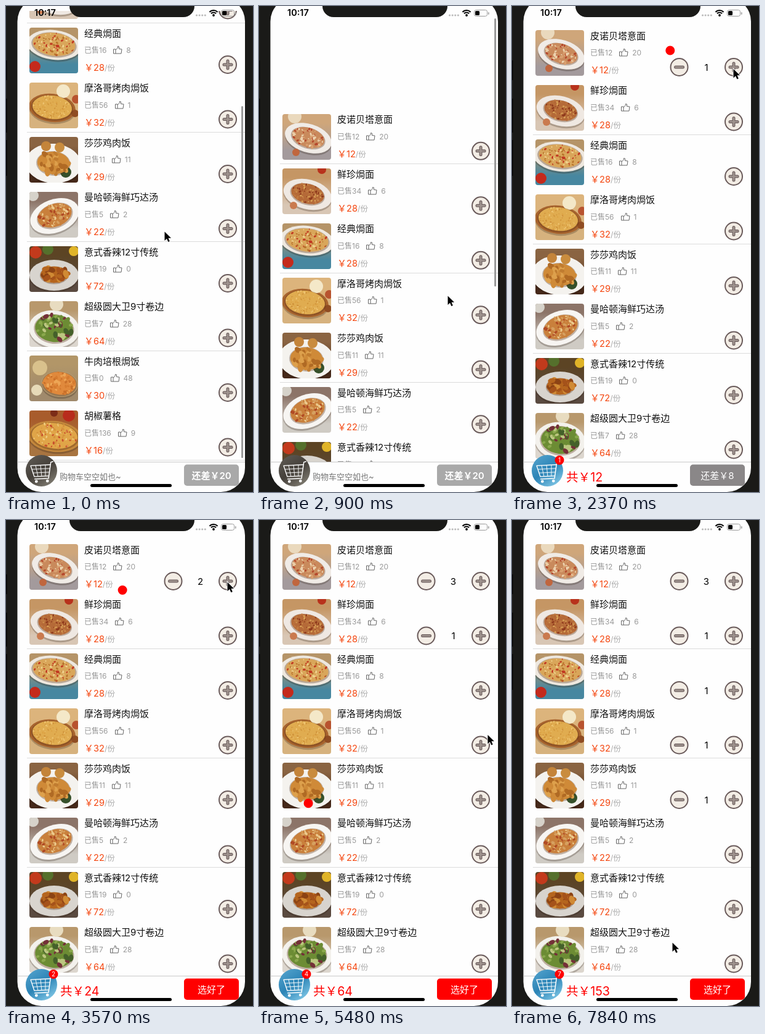
These frames come from a looping animation (401x787 px, 7990 ms). An HTML page with a canvas:

```html
<!DOCTYPE html>
<html lang="zh">
<head>
<meta charset="utf-8">
<style>
html, body { margin: 0; width: 100%; height: 100%; overflow: hidden; background: #1a1a18; }
canvas { display: block; }
</style>
</head>
<body>
<canvas id="stage" width="401" height="787"></canvas>
<script>
const ctx = document.getElementById('stage').getContext('2d');
const FONT = 'Inter, "Noto Sans CJK SC", "Noto Sans CJK", sans-serif';
const LOOP = 7990, STEP = LOOP / 54;
const PITCH = 88.5, REST_TOP = 39, FLIGHT = 650, MINIMUM = 20;

// name, sold, likes, price
const menu = [
  ['皮诺贝塔意面', 12, 20, 12],
  ['鲜珍焗面', 34, 6, 28],
  ['经典焗面', 16, 8, 28],
  ['摩洛哥烤肉焗饭', 56, 1, 32],
  ['莎莎鸡肉饭', 11, 11, 29],
  ['曼哈顿海鲜巧达汤', 5, 2, 22],
  ['意式香辣12寸传统', 19, 0, 72],
  ['超级圆大卫9寸卷边', 7, 28, 64],
  ['牛肉培根焗饭', 0, 48, 30],
  ['胡椒薯格', 136, 9, 16]
];

// background top and bottom, plate colour, plate [x, y, rx, ry, angle], [food share, chunk size], food colours, side circles [colour, x, y, r]
const dishes = [
  ['#cfa67a', '#a39a9c', '#f0ebe6', [42, 39, 39, 23, .3], [.74, 2.5], '#c98a5c #b5482c #ecd2ae #d9a070', [['#ead9bd', 20, 4, 11], ['#c0663e', 22, 62, 6]]],
  ['#c59664', '#d8c6b4', '#efe8e2', [41, 42, 40, 24, .25], [.72, 2], '#b56a38 #8f3a1c #d9a258 #c07a40', [['#b8321c', 64, 2, 7], ['#ca7a4e', 18, 60, 6]]],
  ['#b59468', '#4787a0', '#eee8df', [40, 28, 44, 24, .12], [.84, 2.2], '#d9a65a #c23a22 #efd08c #b8742c', [['#c42a1c', 9, 63, 9]]],
  ['#dcb47c', '#d6b27e', '#a8642e', [37, 41, 38, 23, .12], [.9, 1.6], '#e0ac50 #cf923a #eec472 #dca244', [['#f4e8c8', 55, 14, 11], ['#b8532f', 76, 27, 7], ['#8f4c22', 74, 50, 6]]],
  ['#8a6442', '#46291a', '#f4f2ee', [39, 43, 45, 32, .08], [.62, 6], '#cf8a38 #b06a24 #dda04c #c07c30', [['#c4843a', 27, 15, 8], ['#c98c3e', 49, 17, 8], ['#35502a', 59, 57, 9]]],
  ['#8c7468', '#cfcbc4', '#f7f5f2', [41, 39, 41, 27, -.35], [.74, 2.6], '#c9803c #b04a24 #ecc98c #d6a060', [['#d6d2ca', 6, 6, 9]]],
  ['#5c4424', '#5a4a40', '#d8d4ce', [40, 47, 40, 25, 0], [.58, 6], '#b5651e #8c4314 #d08a34 #a5521a', [['#c23a1c', 10, 10, 10], ['#55702c', 30, 5, 9], ['#e0b428', 72, 8, 8]]],
  ['#b8986c', '#dcd6ce', '#f3f1ec', [40, 45, 41, 30, .1], [.8, 5], '#6c8c34 #8aa84c #743038 #44602a #bcc680', [['#e8dcc0', 44, 5, 11]]],
  ['#b29668', '#a08a6c', '#b59a70', [49, 46, 30, 21, .1], [.95, 3], '#e0893c #c9702a #eda656 #d67c30', [['#d9c18c', 17, 20, 12], ['#e6dab8', 12, 56, 9]]],
  ['#a85c2c', '#a87440', '#c4883c', [41, 42, 44, 25, .1], [.9, 2.2], '#e0a548 #c8502c #f0cc80 #d6923c', [['#b82c1c', 64, 8, 10], ['#7c2c18', 40, 4, 6]]]
];

// start time and row of each tap on a plus button
const taps = [[1570, 0], [2228, 0], [3300, 0], [4361, 1], [4950, 2], [5650, 3], [6254, 4]];

// time, x, y of the pointer tip
const pointerPath = [
  [0, 257, 365], [888, 306, 469], [1480, 361, 118], [1600, 359, 102], [3950, 359, 100],
  [4250, 373, 174], [4587, 373, 174], [4900, 370, 270], [5100, 370, 270], [5600, 371, 362],
  [5750, 371, 362], [6200, 371, 452], [6480, 371, 452], [6660, 384, 480], [6820, 350, 560], [7400, 260, 684], [LOOP, 260, 684]
];

const clamp = v => Math.max(0, Math.min(1, v));
const smooth = v => v * v * (3 - 2 * v);

function text(str, x, y, size, color, weight = 400, align = 'left') {
  ctx.font = `${weight} ${size}px ${FONT}`;
  ctx.fillStyle = color;
  ctx.textAlign = align;
  ctx.fillText(str, x, y);
  return x + ctx.measureText(str).width;
}

function disc(c, x, y, r, color, ry = r, angle = 0) {
  c.fillStyle = color;
  c.beginPath();
  c.ellipse(x, y, r, ry, angle, 0, Math.PI * 2);
  c.fill();
}

function box(x, y, w, h, r, color) {
  ctx.fillStyle = color;
  ctx.beginPath();
  ctx.roundRect(x, y, w, h, r);
  ctx.fill();
}

function line(points, color, width) {
  ctx.strokeStyle = color;
  ctx.lineWidth = width;
  ctx.beginPath();
  points.forEach(([x, y]) => ctx.lineTo(x, y));
  ctx.stroke();
}

function makePhoto([top, bottom, plateColor, [px, py, rx, ry, angle], [share, chunk], foods, sides], index) {
  const canvas = document.createElement('canvas');
  canvas.width = 79;
  canvas.height = 74;
  const c = canvas.getContext('2d');
  let seed = index * 97 + 13;
  const random = () => (seed = (seed * 16807) % 2147483647) / 2147483647;
  const colors = foods.split(' ');
  c.beginPath();
  c.roundRect(0, 0, 79, 74, 4);
  c.clip();
  const shade = c.createLinearGradient(0, 0, 0, 74);
  shade.addColorStop(.2, top);
  shade.addColorStop(.8, bottom);
  c.fillStyle = shade;
  c.fillRect(0, 0, 79, 74);
  disc(c, px, py + 3, rx, 'rgba(40,25,15,.25)', ry, angle);
  disc(c, px, py, rx, plateColor, ry, angle);
  sides.forEach(([color, x, y, r]) => disc(c, x, y, r, color));
  c.translate(px, py - 1);
  c.rotate(angle);
  const fx = rx * share, fy = ry * share;
  disc(c, 0, 1, fx, 'rgba(90,50,20,.35)', fy);
  disc(c, 0, 0, fx * .94, colors[0], fy * .92);
  for (let i = 0; i < 240 / chunk; i++) {
    const a = random() * Math.PI * 2, d = Math.sqrt(random()) * .9;
    const size = chunk * (.5 + random() * .7);
    disc(c, Math.cos(a) * d * fx, Math.sin(a) * d * fy, size, colors[i % colors.length], size * .65, random() * 3);
  }
  return canvas;
}
const photos = dishes.map(makePhoto);

function roundButton(x, y, isPlus) {
  disc(ctx, x, y, 14, '#f3ede5');
  ctx.strokeStyle = '#6a5b5b';
  ctx.lineWidth = 2;
  ctx.stroke();
  ctx.lineCap = 'round';
  for (const [color, width] of [['#6f6160', 5], ['#a0948f', 2.6]]) {
    line([[x - 6, y], [x + 6, y]], color, width);
    if (isPlus) line([[x, y - 6], [x, y + 6]], color, width);
  }
  ctx.lineCap = 'butt';
}

function thumb(x, y) {
  ctx.lineJoin = 'round';
  line([[x + .5, y + 5], [x + 4, y + 5], [x + 4, y + 12], [x + .5, y + 12], [x + .5, y + 5]], '#666', 1);
  line([[x + 4, y + 6], [x + 7, y + 3.5], [x + 7.5, y + .5], [x + 9.5, y + 1], [x + 9.5, y + 4.5],
    [x + 14, y + 5], [x + 13, y + 12], [x + 4, y + 12]], '#666', 1);
}

function drawRow(index, top, count) {
  const [name, sold, likes, price] = menu[index];
  ctx.drawImage(photos[index], 38, Math.round(top));
  text(name, 127, top + 14.5, 15, '#111');
  const soldEnd = text('已售' + sold, 127, top + 41, 12, '#999');
  thumb(Math.round(soldEnd + 11), Math.round(top + 30));
  text(likes, soldEnd + 32, top + 41, 12, '#999');
  const yenEnd = text('￥', 127, top + 70, 15, '#f4460f');
  const priceEnd = text(price, yenEnd, top + 70, 14.6, '#f4460f');
  text('/份', priceEnd, top + 70, 12.5, '#aaa');
  roundButton(360, top + 60, true);
  if (count) {
    roundButton(271.5, top + 60, false);
    text(count, 315.5, top + 65.5, 15, '#000', 400, 'center');
  }
}

function scrollShift(t) {
  if (t < 980) return -181 + 317 * smooth(clamp(t / 900));
  const s = (t - 980) / 1000 * 12;
  return Math.round(136 * (1 + s) * Math.exp(-s));
}

function drawList(t, counts) {
  const shift = scrollShift(t);
  ctx.save();
  ctx.beginPath();
  ctx.rect(18, 8, 370, 730);
  ctx.clip();
  menu.forEach((_, i) => {
    const top = REST_TOP + shift + i * PITCH;
    if (top < -90 || top > 740) return;
    drawRow(i, top, counts[i]);
    const lineVisible = shift > 10 ? i % 2 === 0 : shift <= 0 && i % 2 === 1;
    if (lineVisible) {
      ctx.fillStyle = '#dcdcdc';
      ctx.fillRect(34, Math.round(top + 80.5), 354, 1);
    }
  });
  ctx.globalAlpha = 1 - clamp((t - 1650) / 300);
  box(382, 20 + Math.max(0, -shift) / 181 * 142, 3, 570 - Math.max(0, shift), 1.5, '#999');
  ctx.restore();
}

function drawCart(count, t) {
  const r = t > 6300 ? 24.5 : 25.5;
  const shade = ctx.createLinearGradient(40, 730, 72, 776);
  const tones = count ? ['#4f9fca', '#2c84b6', '#7cc4e4'] : ['#5c5852', '#45403a', '#7e7a70'];
  tones.forEach((tone, i) => shade.addColorStop(i / 2, tone));
  disc(ctx, 57.5, 752.5, r, shade);
  ctx.save();
  ctx.translate(57.5, 753.5);
  ctx.rotate(-.05);
  ctx.lineJoin = 'round';
  line([[20, -15], [16, -14], [11, 12], [-12, 12]], '#fff', 1.5);
  line([[15, -10], [-17, -10], [-12, 8], [12, 8]], '#fff', 1.4);
  line([[-15, -4], [14, -4]], '#fff', .9);
  line([[-14, 2], [13, 2]], '#fff', .9);
  for (let i = 1; i < 4; i++) line([[-17 + i * 8, -10], [-12 + i * 6, 8]], '#fff', .9);
  disc(ctx, -9, 16, 2.4, '#fff');
  disc(ctx, 9, 16, 2.4, '#fff');
  ctx.restore();
  if (count) {
    disc(ctx, 77, 735.5, 7.5, '#f00');
    text(count, 77, 739, 10, '#fff', 400, 'center');
  }
}

function drawBar(t, counts) {
  const count = counts.reduce((a, b) => a + b, 0);
  const total = counts.reduce((sum, n, i) => sum + n * menu[i][3], 0);
  ctx.fillStyle = '#c9c9c9';
  ctx.fillRect(18, 738, 370, 1);
  drawCart(count, t);
  if (count) text('共￥' + total, 88, 769.5, 19.6, '#f00');
  else text('购物车空空如也~', 87, 767, 13, '#777');
  const ready = total >= MINIMUM;
  box(289, 742.5, 89, 34.5, 5, ready ? '#f00' : count ? '#8a8788' : '#a9a9a9');
  text(ready ? '选好了' : '还差￥' + (MINIMUM - total), 333.5, 765.5, 15, '#fff', count ? 400 : 600, 'center');
}

function drawStatus() {
  text('10:17', 46, 16, 14.5, '#000', 600);
  for (let i = 0; i < 4; i++) disc(ctx, 309.5 + i * 4.6, 15, 1.6, '#bbb');
  ctx.strokeStyle = '#000';
  ctx.lineWidth = 2.2;
  for (const r of [9, 5.5]) {
    ctx.beginPath();
    ctx.arc(337, 16, r, -Math.PI * .76, -Math.PI * .24);
    ctx.stroke();
  }
  disc(ctx, 337, 15, 1.9, '#000');
  ctx.strokeStyle = '#999';
  ctx.lineWidth = 1;
  ctx.beginPath();
  ctx.roundRect(349.5, 6.5, 21, 10, 3);
  ctx.stroke();
  box(351, 8, 7, 7, 1.5, '#000');
  box(372, 10, 1.5, 4, 1, '#999');
}

function drawDots(t) {
  for (const [start, row] of taps) {
    const p = (t - start) / FLIGHT, q = 1 - p;
    if (p < 0 || p >= 1) continue;
    const startY = REST_TOP + 60 + row * PITCH;
    const x = q * q * 360 + 2 * p * q * 95 + p * p * 57;
    const y = q * q * startY - 2 * p * q * 66 + p * p * 720;
    disc(ctx, x, y, 7.5, '#f00');
  }
}

function drawPointer(t) {
  const i = pointerPath.findIndex(key => key[0] > t);
  const [t0, x0, y0] = pointerPath[i - 1], [t1, x1, y1] = pointerPath[i];
  const p = smooth((t - t0) / (t1 - t0));
  ctx.save();
  ctx.translate(x0 + (x1 - x0) * p, y0 + (y1 - y0) * p);
  const arrow = new Path2D('M.5 .5V15L4 11.8L6.3 17L8.8 16L6.5 10.8H11Z');
  ctx.strokeStyle = '#fff';
  ctx.lineWidth = 1.8;
  ctx.stroke(arrow);
  ctx.fillStyle = '#000';
  ctx.fill(arrow);
  ctx.restore();
}

function drawPhone() {
  ctx.fillStyle = '#1a1a18';
  ctx.fillRect(0, 0, 401, 787);
  for (const [y, h] of [[88, 32], [150, 55], [217, 58]]) box(0, y, 1.5, h, 0, '#000');
  box(18.5, -14, 369.5, 801, 39, '#fefefe');
}

function draw(t) {
  const counts = menu.map((_, row) => taps.filter(tap => tap[1] === row && tap[0] + FLIGHT <= t).length);
  drawPhone();
  ctx.save();
  ctx.beginPath();
  ctx.roundRect(18.5, -14, 369.5, 801, 39);
  ctx.clip();
  drawList(t, counts);
  drawBar(t, counts);
  drawStatus();
  box(103, -20, 203, 38, 18, '#1a1a18');
  box(137, 774, 132, 5, 2.5, '#000');
  ctx.restore();
  drawDots(t);
  drawPointer(t);
}

// the screen updates at a fixed, low rate
function tick(now) {
  draw(Math.floor((now % LOOP) / STEP + .05) % 54 * STEP);
  requestAnimationFrame(tick);
}
requestAnimationFrame(tick);
</script>
</body>
</html>
```
